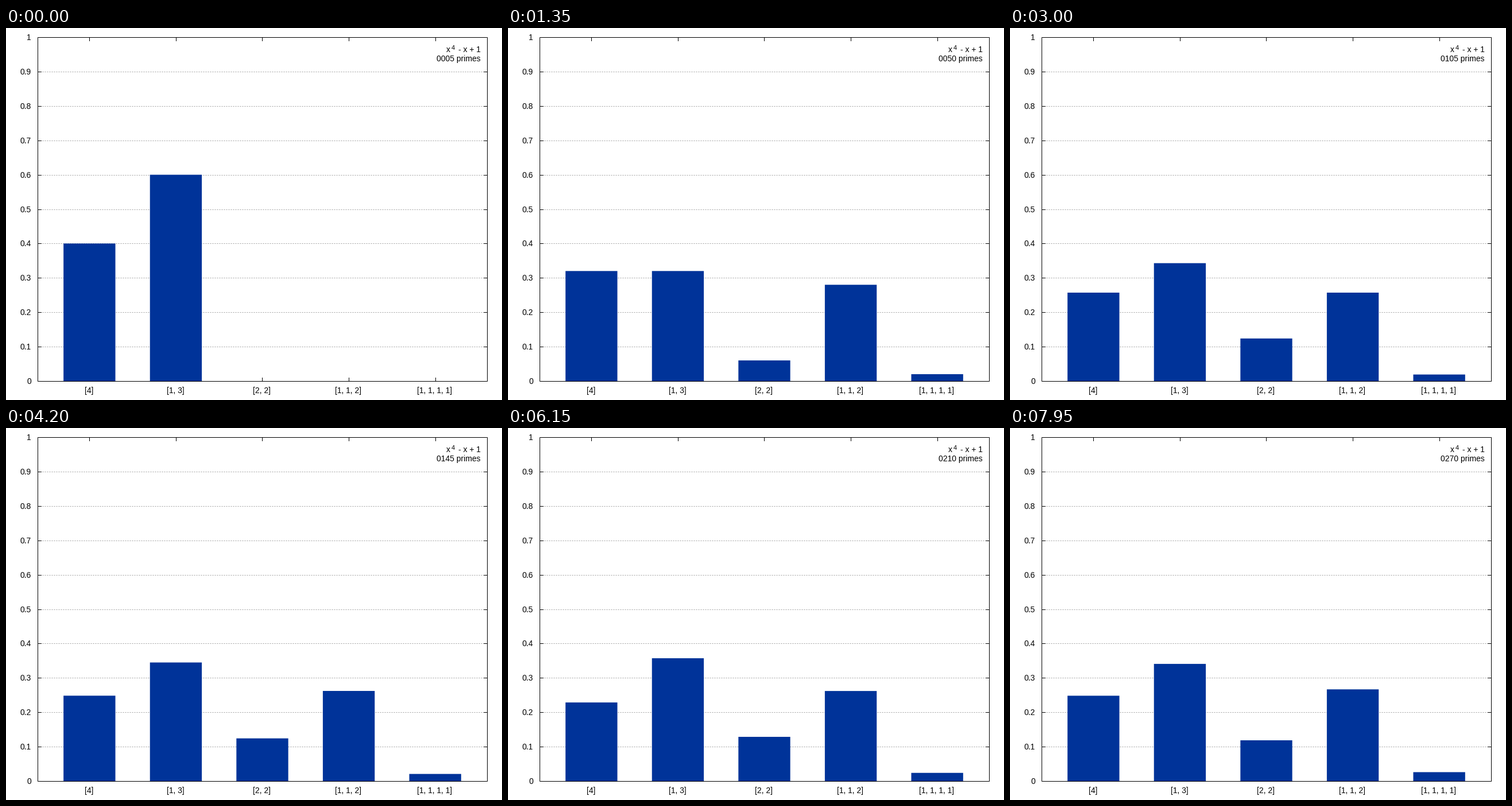
Write a matplotlib script that moves like this. It is 864 px wide and 648 px high and loops after 8000 ms.

```python
import matplotlib.pyplot as plt
import numpy as np
from matplotlib.animation import FuncAnimation
from matplotlib.patches import Rectangle

W, H, DPI = 864, 648, 100
LEFT, RIGHT, TOP, BOTTOM = 55, 838, 16, 615
PIXEL = 72 / DPI
TICK = 6
BLUE, GRAY = "#003399", "#a0a0a0"
LABELS = ["[4]", "[1, 3]", "[2, 2]", "[1, 1, 2]", "[1, 1, 1, 1]"]
BAR_WIDTH = 0.6
DISCRIMINANT = 229
STEP, STEPS = 5, 54
TICKS_PER_STEP, INTERVAL, FRAMES = 3, 50, 160

plt.rcParams["font.family"] = "Liberation Sans"


def unramified_primes(limit):
    return [p for p in range(2, limit)
            if p != DISCRIMINANT and all(p % d for d in range(2, int(p ** 0.5) + 1))]


def pattern(p):
    """Index of the factorisation type of x^4 - x + 1 modulo p."""
    x = np.arange(p, dtype=np.int64)
    roots = np.count_nonzero((x ** 4 - x + 1) % p == 0)
    if roots:
        return {1: 1, 2: 3, 4: 4}[roots]
    even = pow(p, (DISCRIMINANT - 1) // 2, DISCRIMINANT) == 1
    return 2 if even else 0


types = np.array([pattern(p) for p in unramified_primes(1800)[:STEP * STEPS]])

fig = plt.figure(figsize=(W / DPI, H / DPI), dpi=DPI, facecolor="white")
ax = fig.add_axes([0, 0, 1, 1])
ax.set(xlim=(0, W), ylim=(H, 0))
ax.axis("off")


# Whole coordinates name a pixel row or column; snapping centres the stroke on it.
def line(x0, y0, x1, y1, color="black", zorder=2, style="-"):
    ax.plot([x0, x1], [y0, y1], color=color, lw=PIXEL, ls=style, zorder=zorder, snap=True)


def text(x, y, s, ha="right", size=10):
    return ax.text(x, y, s, ha=ha, va="baseline", fontsize=size, zorder=5)


for k in range(11):
    y = round(BOTTOM - k * (BOTTOM - TOP) / 10)
    if 0 < k < 10:
        line(LEFT, y, RIGHT, y, GRAY, 1, (0, (2, 2)))
        line(LEFT, y, LEFT + TICK, y)
        line(RIGHT - TICK, y, RIGHT, y)
    text(44, y + 5, f"{k / 10:g}")

bars = []
unit = (RIGHT - LEFT) / 5.2
for i, label in enumerate(LABELS):
    center = LEFT + (i + 0.6) * unit
    x = round(center)
    line(x, TOP, x, TOP + TICK)
    line(x, BOTTOM - TICK, x, BOTTOM)
    text(center - 0.7, 636, label, "center")
    bar = Rectangle((center - BAR_WIDTH * unit / 2, BOTTOM), BAR_WIDTH * unit, 0,
                    color=BLUE, lw=0, zorder=3, snap=False)
    bars.append(ax.add_patch(bar))

ax.add_patch(Rectangle((LEFT, TOP), RIGHT - LEFT, BOTTOM - TOP,
                       fill=False, ec="black", lw=PIXEL, zorder=4, snap=True))

text(767, 42, "x", "left")
text(776, 38, "4", "left", 8)
text(827, 42, "- x + 1")
counter = text(827, 58, "")


def update(frame):
    n = STEP * (frame // TICKS_PER_STEP + 1)
    shares = np.bincount(types[:n], minlength=len(LABELS)) / n
    for bar, share in zip(bars, shares):
        bar.set_height(-share * (BOTTOM - TOP))
    counter.set_text(f"{n:04d} primes")
    return [*bars, counter]


anim = FuncAnimation(fig, update, frames=FRAMES, interval=INTERVAL,
                     repeat=True, repeat_delay=0)
plt.show()
```
